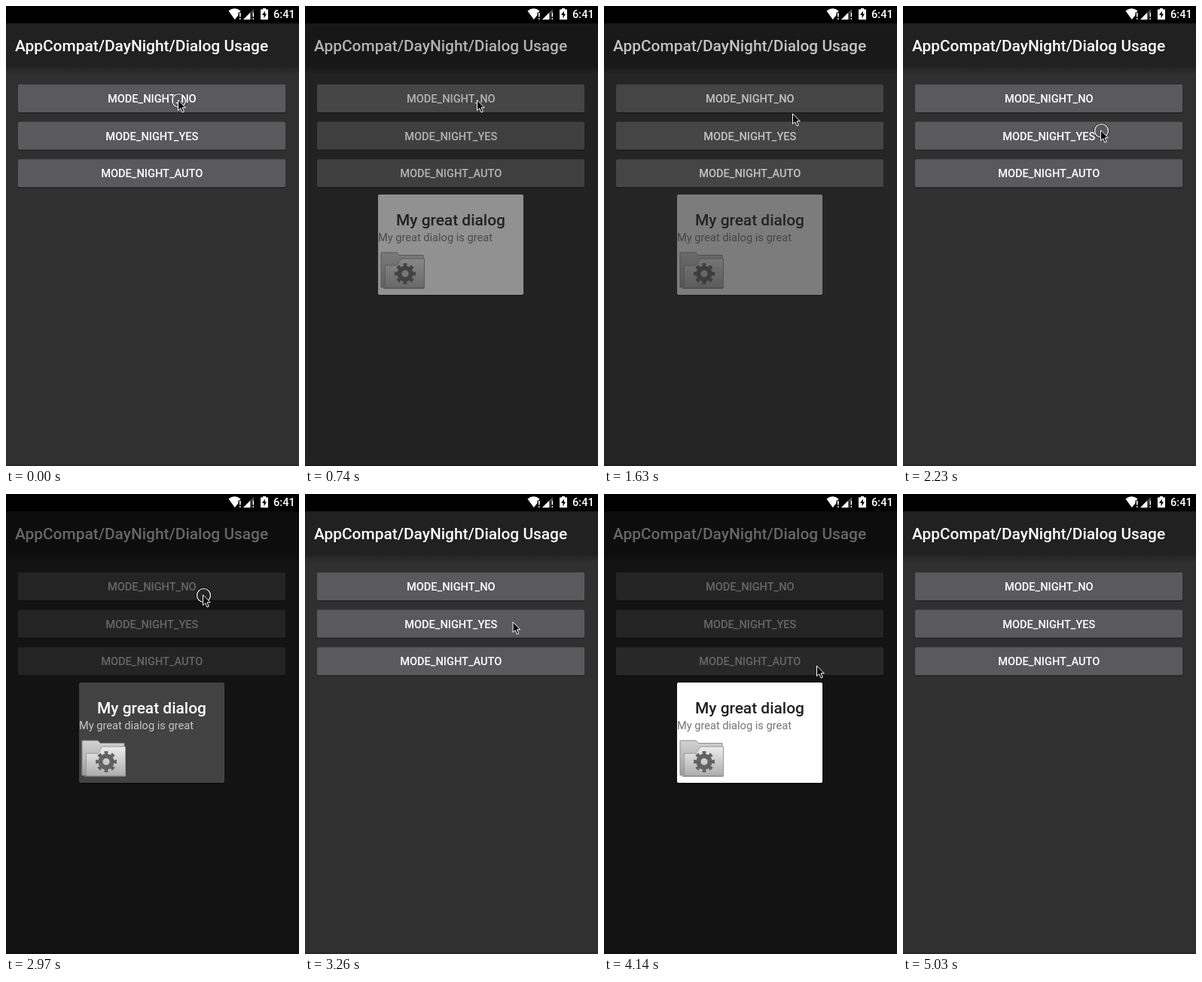
Recreate the animation shown at these times as an HTML page. Size 389 by 610 pixels, loop 5620 ms.

```html
<!DOCTYPE html>
<html lang="en">
<head>
<meta charset="utf-8">
<title>Day and night dialogs</title>
<style>
  html, body { margin: 0; width: 100%; height: 100%; overflow: hidden; background: #303030; }
  svg { display: block; width: 389px; height: 610px; }
  text { font: 500 14.6px Roboto, Arial, sans-serif; fill: #fff; }
  .title { font-size: 20.9px; }
  .label { text-anchor: middle; }
  .body { font-weight: 400; }
</style>
</head>
<body>
<svg viewBox="0 0 389 610">
  <defs>
    <linearGradient id="shade" x2="0" y2="1">
      <stop stop-color="#000" stop-opacity=".22"/><stop offset="1" stop-color="#000" stop-opacity=".04"/>
    </linearGradient>
    <linearGradient id="back" x2="0" y2="1">
      <stop stop-color="#d2d2d2"/><stop offset="1" stop-color="#9c9c9c"/>
    </linearGradient>
    <linearGradient id="front" x2="0" y2="1">
      <stop stop-color="#ececec"/><stop offset="1" stop-color="#adadad"/>
    </linearGradient>
  </defs>

  <rect width="389" height="610" fill="#303030"/>
  <rect y="82" width="389" height="8" fill="url(#shade)"/>
  <rect y="23" width="389" height="59" fill="#212121"/>
  <rect y="608" width="389" height="2" fill="#282828"/>
  <text class="title" x="12" y="60">AppCompat/DayNight/Dialog Usage</text>
  <g id="buttons"></g>
  <rect id="dim" y="23" width="389" height="587"/>

  <!-- status bar -->
  <rect width="389" height="23"/>
  <g fill="#fff">
    <path d="M295.5 6.5Q303.5 0 311.5 6.5L310 8.5H308.5V12L303.8 18Z"/>
    <path d="M315 18L329 4V9H326V18Z" fill="#555"/>
    <path d="M315 18L324 9V18Z"/>
    <path d="M338 4.500h3v-1.500h4v1.500h3V18h-10z"/>
    <path d="M343.800 6.500L340 12h2.500v4.200L346 10.500h-2.200z" fill="#000"/>
  </g>
  <path d="M310.800 9V17.700M328.300 9V17.700" stroke="#fff" stroke-width="1.600" stroke-dasharray="5.500 1.500"/>
  <text x="355" y="16">6:41</text>

  <g id="dialog">
    <rect x="97" y="252" width="193" height="133" rx="3" opacity=".35"/>
    <rect id="panel" x="97" y="250" width="193" height="133" rx="2"/>
    <text class="title" id="heading" x="121" y="291">My great dialog</text>
    <text class="body" id="message" x="97" y="312">My great dialog is great</text>
    <path d="M101 327H122L125 330.500H157V373H101z" fill="url(#back)" stroke="#8c8c8c" stroke-linejoin="round"/>
    <path d="M106.500 344H122L128 335H158.500V374H106.500z" fill="url(#front)" stroke="#999" stroke-linejoin="round"/>
    <path d="M104 374.300H158" stroke="#777"/>
    <g fill="none" stroke="#626262">
      <circle cx="133" cy="355" r="7.600" stroke-width="6"/>
      <circle cx="133" cy="355" r="12" stroke-width="4" pathLength="16" stroke-dasharray="1" stroke-dashoffset=".5"/>
    </g>
  </g>

  <g id="pointer">
    <g id="ring" fill="none">
      <circle cx="1.500" cy="1.500" r="9.700" stroke="#000" stroke-opacity=".6" stroke-width="1.500"/>
      <circle cx="1.500" cy="1.500" r="9" stroke="#fff" stroke-width="1.200"/>
    </g>
    <path d="M.5 .8V14.500L3.700 11.600L6 17L8.300 16L6 10.800H10.300Z" stroke="#fff"/>
  </g>
</svg>
<script>
const LOOP = 5620, STEP = 150;
const $ = id => document.getElementById(id);
const set = (id, attrs) => Object.entries(attrs).forEach(([k, v]) => $(id).setAttribute(k, v));

$('buttons').innerHTML = ['NO', 'YES', 'AUTO'].map((mode, i) => {
  const y = 104 + i * 49.6;
  const box = `x="16" width="355" height="37" rx="2"`;
  return `<rect ${box} y="${y + 1.5}" opacity=".3"/>
    <rect ${box} y="${y}" fill="#5a5a5c"/>
    <rect ${box} y="${y}" id="press${i}" fill="#fff"/>
    <text class="label" x="193.8" y="${y + 24}">MODE_NIGHT_${mode}</text>`;
}).join('');

const rounds = [
  { open: 740, close: 1630 },
  { open: 2520, close: 3120 },
  { open: 3990, close: 4740 }
];
const clicks = [0, 1480, 2230, 2970, 3850, 4590];

// pointer stops: time, x, y
const stops = [
  [0, 228, 124], [1340, 243, 138], [1480, 250, 142], [1780, 260, 160], [1930, 262, 164],
  [2820, 261, 140], [2970, 261, 133], [3120, 264, 140], [3260, 275.5, 169],
  [3410, 279, 200], [3560, 281.5, 224], [3850, 282, 227],
  [4290, 306, 290], [4440, 340, 385], [4590, 358, 430], [4880, 375, 460], [5030, -50, -50]
];

function opacity(t, { open, close }) {
  if (t < open || t >= close + STEP - 10) return 0;
  if (t >= close) return .4;
  return t < open + STEP ? .5 : 1;
}

function draw(now) {
  const t = now % LOOP;
  const [, x, y] = stops.filter(s => s[0] <= t).pop();
  const found = rounds.findIndex(r => t < r.close + STEP);
  const index = found < 0 ? 2 : found;
  const round = rounds[index];
  const shown = opacity(t, round);
  const pressed = t >= round.open - STEP && t < round.open + 4 * STEP;
  const night = index === 1;

  set('dim', { opacity: .6 * shown });
  set('dialog', { opacity: shown });
  set('panel', { fill: night ? '#424242' : '#fff' });
  $('heading').style.fill = night ? '#fff' : '#212121';
  $('message').style.fill = night ? '#c6c6c6' : '#757575';
  set('pointer', { transform: `translate(${x} ${y})` });
  set('ring', { opacity: clicks.some(c => t >= c && t < c + STEP - 10) ? 1 : 0 });
  rounds.forEach((_, i) => set('press' + i, { opacity: i === index && pressed && !(night && shown === 1) ? .06 : 0 }));
}

const start = performance.now();
function tick() {
  draw(performance.now() - start);
  requestAnimationFrame(tick);
}
tick();
</script>
</body>
</html>
```
